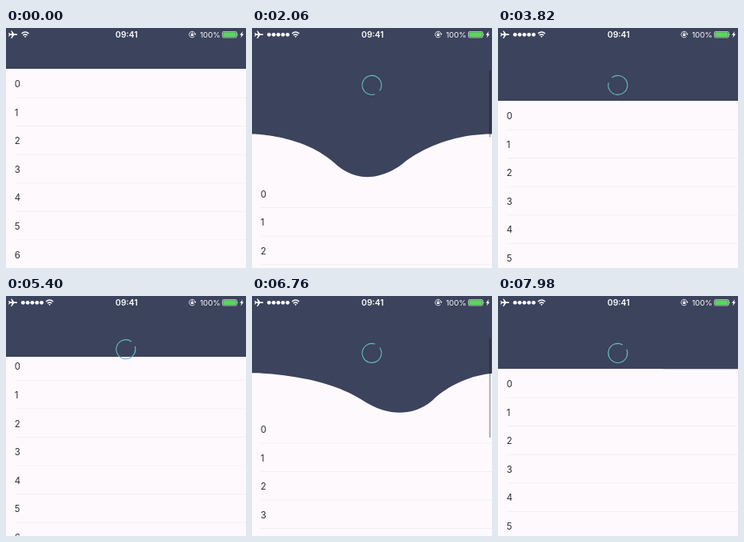
An HTML page for the animation above (8000 ms loop, 300 by 300 pixels).

```html
<!DOCTYPE html>
<html lang="en">
<head>
<meta charset="utf-8">
<title>Elastic pull to refresh</title>
<style>
  html, body { margin: 0; width: 100%; height: 100%; overflow: hidden; background: #fdf9fd; }
  svg { display: block; width: 100vw; height: 100vh; }
  text { font-family: Inter, Roboto, "Liberation Sans", sans-serif; }
</style>
</head>
<body>
<svg viewBox="0 0 300 300">
  <defs>
    <clipPath id="headerClip"><path id="clipShape"/></clipPath>
  </defs>
  <rect width="300" height="300" fill="#fdf9fd"/>
  <g id="rows" font-size="11.4" fill="#2b2b30"></g>
  <path id="header" fill="#3c435c"/>
  <g clip-path="url(#headerClip)">
    <circle id="ring" r="12" fill="none" stroke="#62bcc3" stroke-width="1.1" pathLength="360"/>
  </g>
  <rect id="scrollbar" x="296.600" y="53" width="1.700" rx=".8" fill="#000" fill-opacity=".36"/>
  <g fill="#fff">
    <path d="M14 8.2c0-.6-.6-.9-1.4-.9h-2.500L7.200 3.500H6.100l1.500 3.800H5.100L4 5.900H3.100l.7 2.300-.7 2.300H4l1.100-1.400h2.500l-1.500 3.800h1.100l2.900-3.800h2.500c.8 0 1.400-.3 1.400-.9z"/>
    <g id="dots"></g>
    <g id="wifi" fill="none" stroke="#fff" stroke-width="1.500">
      <path d="M-4.500-1.300Q0-5.300 4.500-1.300M-2.700.9Q0-1.500 2.700.9"/>
      <path d="M-1.400 2.200Q0 1 1.400 2.200L0 3.700Z" fill="#fff" stroke="none"/>
    </g>
    <text x="150.700" y="12" font-size="10.400" font-weight="600" text-anchor="middle">09:41</text>
    <g transform="translate(232.700 8.300) scale(.9) translate(-233 -8.300)">
      <path d="M236.300 10.700A4.200 4.200 0 1 1 237.200 7.500M231.900 7.700V6.800a1.200 1.200 0 0 1 2.400 0v.9" fill="none" stroke="#fff" stroke-width=".9"/>
      <rect x="231.300" y="7.500" width="3.600" height="2.700"/>
      <path d="M235.700 7h3l-1.500 2z"/>
    </g>
    <text x="267.900" y="11.900" font-size="9.600" text-anchor="end">100%</text>
    <rect x="270.500" y="4.500" width="18" height="7.500" rx="1.500" fill="none" stroke="#c9d1d4" stroke-width=".8"/>
    <rect x="271.300" y="5.300" width="16.400" height="5.900" rx=".8" fill="#5bd65e"/>
    <path d="M289.200 6.900q1.300 1.300 0 2.700z"/>
    <path d="M296 4l-3.700 4.800h2l-1 3.800 3.800-5h-2.100z"/>
  </g>
</svg>
<script>
const LOOP = 8000, NAV = 51, LOADING = 40, WIDTH = 300, MAX_WAVE = 56;
const SPRING_MS = 900, SETTLE_MS = 360;
const HEADER_LAG = 40, RING_LAG = 76;

// Each pull: finger travel, finger x, release, spinner stop and list closing.
const pulls = [
  { drag: [[790, 0], [1100, 40], [1500, 105], [1900, 135.5], [2060, 137.5], [2380, 137.5]],
    finger: [[790, 150], [2060, 145], [2380, 145]],
    release: 2380, spinEnd: 5130, close: 5213, closed: 5568 },
  { drag: [[5750, 0], [6050, 9], [6320, 19], [6650, 80], [7000, 126], [7222, 134.5]],
    finger: [[5750, 140], [6320, 142], [6750, 190], [7100, 290], [7222, 296]],
    release: 7222, spinEnd: Infinity, close: Infinity, closed: Infinity }
];

const $ = id => document.getElementById(id);
const clamp = (v, lo = 0, hi = 1) => Math.min(hi, Math.max(lo, v));
const ease = p => { p = clamp(p); return p * p * (3 - 2 * p); };

function add(parent, tag, attrs, text = '') {
  const node = document.createElementNS('http://www.w3.org/2000/svg', tag);
  for (const key in attrs) node.setAttribute(key, attrs[key]);
  node.textContent = text;
  parent.append(node);
}

for (let i = 0; i < 8; i++) {
  add($('rows'), 'text', { x: 10.7, y: 23.2 + i * 35.55 }, i);
  add($('rows'), 'rect', { x: 11, y: 35.7 + i * 35.55, width: 289, height: .8, fill: '#f1edf1' });
}
for (let i = 0; i < 5; i++) add($('dots'), 'circle', { cx: 21.3 + i * 5.8, cy: 8.3, r: 2.4 });

// Smooth curve through [time, value] points.
function sample(keys, t) {
  const last = keys.length - 1;
  if (t <= keys[0][0]) return keys[0][1];
  if (t >= keys[last][0]) return keys[last][1];
  const i = keys.findIndex(k => k[0] > t) - 1;
  const slope = j => j <= 0 || j >= last ? 0 :
    (keys[j + 1][1] - keys[j - 1][1]) / (keys[j + 1][0] - keys[j - 1][0]);
  const [t0, a] = keys[i], [t1, b] = keys[i + 1];
  const d = t1 - t0, u = (t - t0) / d, v = 1 - u;
  return a * v * v * (1 + 2 * u) + b * u * u * (3 - 2 * u)
    + d * u * v * (slope(i) * v - slope(i + 1) * u);
}

// Remaining share of an underdamped spring, 1 at the start.
function spring(ms) {
  if (ms >= SPRING_MS) return 0;
  const zeta = .43, decay = 6.9 / SPRING_MS;
  const freq = decay / zeta * Math.sqrt(1 - zeta * zeta);
  return Math.exp(-decay * ms) * (Math.cos(freq * ms) + decay / freq * Math.sin(freq * ms));
}

function listOffset(pull, t) {
  if (t < pull.release) return Math.max(0, sample(pull.drag, t));
  const from = sample(pull.drag, pull.release);
  if (t < pull.close) return from + (LOADING - from) * ease((t - pull.release) / SETTLE_MS);
  return LOADING * (1 - ease((t - pull.close) / (pull.closed - pull.close)));
}

function wavePath(base, wave, x) {
  const shift = (x - WIDTH / 2) * .28;
  const left = Math.min(shift, 0), right = WIDTH + Math.max(shift, 0);
  const l = k => left + (x - left) * k, r = k => right - (right - x) * k;
  const shoulder = base + wave * .64;
  return `M0 0L0 ${base}L${left} ${base}`
    + `C${left} ${base} ${l(.44)} ${base} ${l(.71)} ${shoulder}`
    + `C${x} ${base + wave * 1.36} ${r(.71)} ${shoulder} ${r(.71)} ${shoulder}`
    + `C${r(.71)} ${shoulder} ${r(.44)} ${base} ${right} ${base}L${right} 0Z`;
}

const flatPath = height => wavePath(NAV + height, 0, WIDTH / 2);

function headerPath(pull, t, offset) {
  if (t >= pull.close) return flatPath(listOffset(pull, t - HEADER_LAG));
  const x = sample(pull.finger, t);
  const height = t < pull.release ? offset : sample(pull.drag, pull.release);
  const wave = Math.min(height / 3 * 1.6, MAX_WAVE), base = NAV + height - wave;
  if (t < pull.release) return wavePath(base, wave, x);
  const left = spring(t - pull.release), rest = NAV + LOADING;
  return wavePath(rest + (base - rest) * left, wave * left, x);
}

function drawRing(pull, t, offset, path) {
  const closing = t >= pull.close;
  const height = closing ? listOffset(pull, t - RING_LAG) : offset;
  const progress = (t < pull.release ? offset : sample(pull.drag, pull.release)) / 76;
  const sweep = 324 * clamp(progress);
  const spin = Math.max(0, Math.min(t, pull.spinEnd) - pull.release) * .36;
  const angle = Math.max(0, progress - 1) * 200 + spin - 90;
  const y = NAV + 12.4 + clamp((height - 24) / 2, 0, 8);
  $('clipShape').setAttribute('d', closing ? flatPath(height) : path);
  $('ring').setAttribute('transform', `translate(149.800 ${y}) rotate(${angle})`);
  $('ring').setAttribute('stroke-dasharray', `${sweep} 720`);
  $('ring').style.display = height > .1 ? '' : 'none';
}

function drawScrollbar(pull, t, offset) {
  const bottom = t < pull.release ? 274 - offset : 300;
  const fadeIn = clamp((t - pull.drag[0][0]) / 80);
  const fadeOut = clamp((t - pull.release - SETTLE_MS) / 250);
  $('scrollbar').setAttribute('height', bottom - 53);
  $('scrollbar').setAttribute('opacity', fadeIn * (1 - fadeOut));
}

function render(t) {
  const pull = t < 5700 ? pulls[0] : pulls[1];
  const offset = listOffset(pull, t);
  const path = headerPath(pull, t, offset);
  const signal = clamp((t - 20) / 160);
  $('rows').setAttribute('transform', `translate(0 ${NAV + offset})`);
  $('header').setAttribute('d', path);
  drawRing(pull, t, offset, path);
  drawScrollbar(pull, t, offset);
  $('dots').setAttribute('opacity', signal);
  $('wifi').setAttribute('transform', `translate(${signal < .5 ? 24 : 54.5} 8.300)`);
}

const start = performance.now();
function tick(now) {
  render(Math.max(0, now - start) % LOOP);
  requestAnimationFrame(tick);
}
render(0);
requestAnimationFrame(tick);
</script>
</body>
</html>
```
